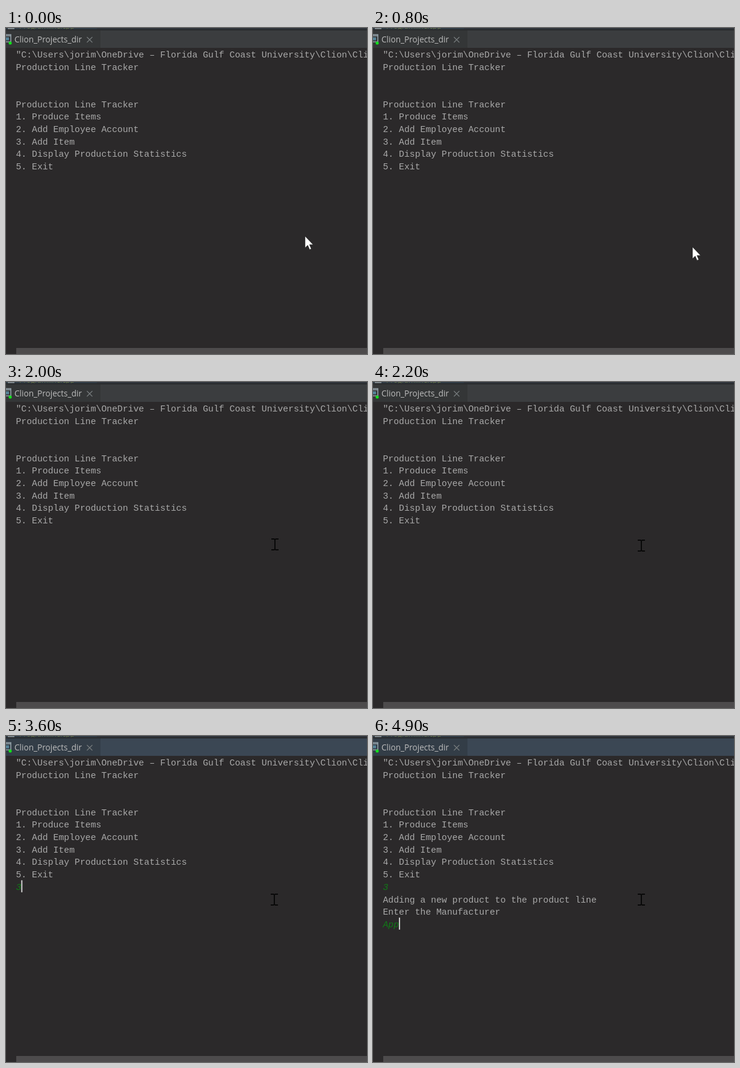
Write an HTML page that moves like this. It is 600 px wide and 542 px high and loops after 5 s.

```html
<!DOCTYPE html>
<html lang="en">
<head>
<meta charset="utf-8">
<title>Production Line Tracker</title>
<style>
  html, body { margin: 0; width: 100%; height: 100%; overflow: hidden; background: #2b292a; }
  svg { display: block; width: 600px; height: 542px; }
  text { white-space: pre; }
  .mono { font: 14.8px "Liberation Mono", "Courier New", monospace; fill: #a9a9a9; }
  .typed { font-style: italic; fill: #117a17; }
  .tab { font: 13.6px "Open Sans", "Noto Sans", sans-serif; fill: #bcbcbc; }
</style>
</head>
<body>
<svg viewBox="0 0 600 542">
  <!-- editor sliver above the panel -->
  <rect width="600" height="2" fill="#30353c"/>
  <rect width="151" height="2" fill="#303c46"/>
  <rect x="3" width="11" height="4" fill="#7d868b"/>
  <text x="22" y="1" font-size="12" font-family="Open Sans, sans-serif" fill="#6f7a48">Programline.cpp</text>
  <rect y="2" width="600" height="2" fill="#292b2d"/>

  <!-- panel header -->
  <rect id="bar" y="4" width="600" height="29"/>
  <rect id="tab" y="4" width="157" height="29"/>
  <path d="M0 11H8V23H0M0 13H8" fill="none" stroke="#93a0a8" stroke-width="1.6"/>
  <rect y="15.5" width="5" height="5" fill="#568398"/>
  <circle cx="7" cy="25" r="2.6" fill="#12e01c"/>
  <text class="tab" x="14" y="24">Clion_Projects_dir</text>
  <path d="M134.5 15l9 9m0-9l-9 9" stroke="#777b7d" stroke-width="1.2"/>

  <g id="lines"></g>
  <rect id="caret" width="2" height="20" fill="#cfcfcf"/>
  <rect x="17" y="532" width="583" height="10" fill="#4d4b4c"/>

  <path id="arrow" d="M0 0V19.5L4.5 15.3L7.600 22.400L10.500 21.200L7.500 14.200H13.500Z"
        fill="#fff" stroke="#111" stroke-width=".6"/>
  <path id="beam" d="M-6-9H-1.5L0-8L1.5-9H6M0-8V8M-6 9H-1.5L0 8L1.5 9H6"
        fill="none" stroke="#080808" stroke-width="2"/>
</svg>
<script>
const LOOP = 5000, STEP = 100, LEFT = 16.4, CHAR = 8.88;
const $ = id => document.getElementById(id);
const baseline = row => 48.8 + 20.7 * row;

const menu = [
  '"C:\\Users\\jorim\\OneDrive – Florida Gulf Coast University\\Clion\\Clion_Projects_dir',
  'Production Line Tracker', '', '',
  'Production Line Tracker',
  '1. Produce Items',
  '2. Add Employee Account',
  '3. Add Item',
  '4. Display Production Statistics',
  '5. Exit'
];
const reply = ['Adding a new product to the product line', 'Enter the Manufacturer'];

const FOCUS = 2500, CHOICE = 3400, ENTER = 3700;
const nameKeys = [4500, 4700, 4800];

// Pointer path: time, x, y
const arrowPath = [[0, 497, 346], [600, 525, 361], [800, 531, 364], [1000, 555, 362], [1200, 580, 355]];
const beamPath = [[1300, 585, 250], [1400, 585, 250], [1500, 572, 236], [1600, 547, 227],
                  [1800, 485, 244], [2000, 447, 270], [2200, 446, 272]];

function addLine(str, row, typed) {
  const el = document.createElementNS('http://www.w3.org/2000/svg', 'text');
  el.setAttribute('class', typed ? 'mono typed' : 'mono');
  el.setAttribute('x', LEFT);
  el.setAttribute('y', baseline(row));
  el.textContent = str;
  $('lines').append(el);
  return el;
}

menu.forEach((s, i) => addLine(s, i));
const choice = addLine('', 10, true);
const replies = reply.map((s, i) => addLine(s, 11 + i));
const maker = addLine('', 13, true);

function show(el, on) {
  el.setAttribute('visibility', on ? 'visible' : 'hidden');
}

function place(el, path, t) {
  const next = path.findIndex(p => p[0] > t);
  let [, x, y] = path[path.length - 1];
  if (next > 0) {
    const [t0, x0, y0] = path[next - 1], [t1, x1, y1] = path[next];
    const k = (t - t0) / (t1 - t0);
    x = x0 + (x1 - x0) * k;
    y = y0 + (y1 - y0) * k;
  }
  el.setAttribute('transform', `translate(${x} ${y})`);
}

function draw(t) {
  const active = t >= FOCUS, entered = t >= ENTER;
  $('bar').setAttribute('fill', active ? '#3b4754' : '#3b3d3f');
  $('tab').setAttribute('fill', active ? '#333d47' : '#343637');

  const isBeam = t >= 1300;
  show($('arrow'), !isBeam);
  show($('beam'), isBeam);
  place(isBeam ? $('beam') : $('arrow'), isBeam ? beamPath : arrowPath, t);

  choice.textContent = t >= CHOICE ? '3' : '';
  replies.forEach(el => show(el, entered));
  maker.textContent = 'App'.slice(0, nameKeys.filter(k => t >= k).length);

  const input = entered ? maker : choice;
  $('caret').setAttribute('x', LEFT + CHAR * input.textContent.length);
  $('caret').setAttribute('y', baseline(entered ? 13 : 10) - 16);
  show($('caret'), active && !(t >= 3100 && t < CHOICE));
}

const start = performance.now();
function tick() {
  const t = (performance.now() - start) % LOOP;
  draw(Math.floor(t / STEP) * STEP);
  requestAnimationFrame(tick);
}
tick();
</script>
</body>
</html>
```
